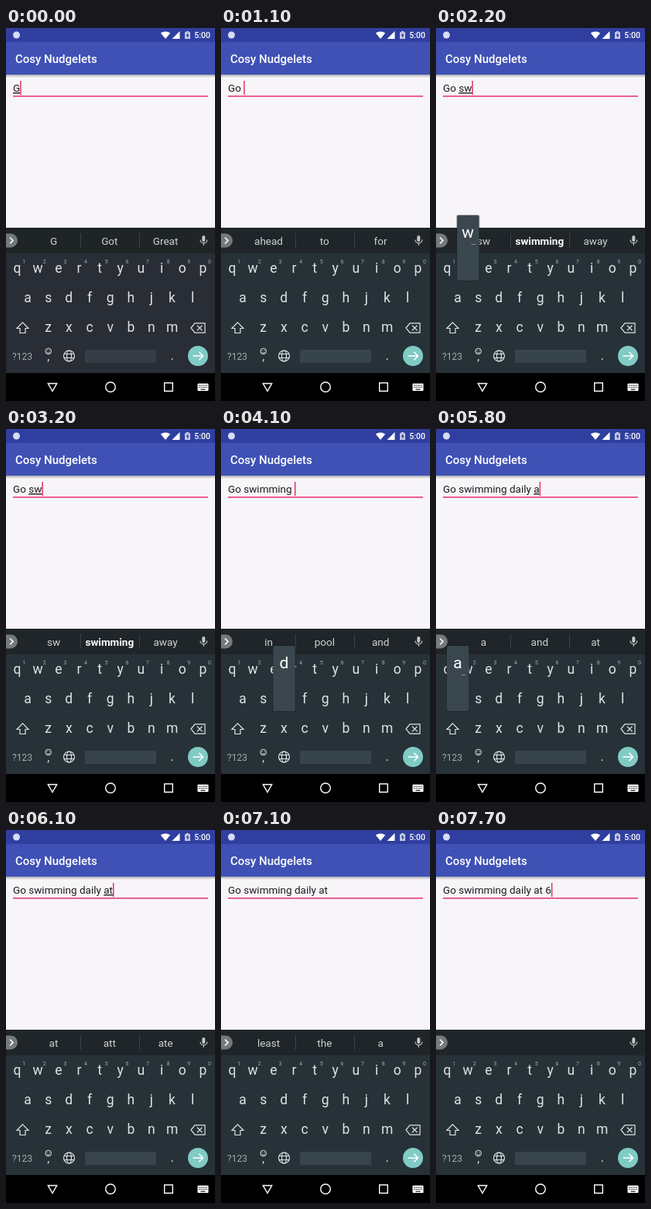
Recreate the animation shown at these times as an HTML page. Size 270 by 480 pixels, loop 8000 ms.

```html
<!DOCTYPE html>
<html lang="en">
<head>
<meta charset="utf-8">
<title>Reminder typing</title>
<style>
html, body { margin: 0; width: 100%; height: 100%; overflow: hidden; }
svg { display: block; width: 100vw; height: 100vh; font-family: Roboto, sans-serif; }
text { white-space: pre; }
.mid { text-anchor: middle; }
.u { text-decoration: underline; }
.line { fill: none; stroke: #dfe3e5; stroke-width: 1.2; }
</style>
</head>
<body>
<svg viewBox="0 0 270 480">
  <defs>
    <linearGradient id="shade" x2="0" y2="1">
      <stop stop-color="#000" stop-opacity=".3"/>
      <stop offset="1" stop-color="#000" stop-opacity="0"/>
    </linearGradient>
  </defs>
  <rect width="270" height="480" fill="#f8f5f9"/>
  <rect y="60" width="270" height="4" fill="url(#shade)"/>
  <rect width="270" height="60" fill="#3f51b5"/>
  <rect width="270" height="18" fill="#303f9f"/>

  <!-- status bar -->
  <g fill="#fff">
    <circle cx="13.5" cy="9" r="4.5" fill="#d5dcf3"/>
    <path d="M206 14L199.8 6.5Q206 2.3 212.2 6.5ZM224.5 4V14H214.5Z"/>
    <path d="M231 5.2H233V4H236V5.2H238V14H231Z" fill="#c3c9e8"/>
    <path d="M235.2 6L232.6 10H234.2V13L236.6 9H235.2Z" fill="#303f9f"/>
    <text x="264" y="13" font-size="10.5" font-weight="500" text-anchor="end">5:00</text>
    <text x="12" y="45" font-size="15" font-weight="500">Cosy Nudgelets</text>
  </g>

  <!-- input field -->
  <rect x="9" y="87" width="252" height="1.5" fill="#e5326f"/>
  <text id="field" x="9" y="82" font-size="13.5" fill="#1c1c1e"></text>
  <rect id="cursor" y="68" width="1.5" height="18" fill="#e5326f"/>

  <!-- keyboard -->
  <rect id="board" y="290" width="270" height="154"/>
  <rect id="strip" y="257" width="270" height="33"/>
  <g id="words" font-size="13.5" fill="#cdd2d4" class="mid"></g>
  <path d="M0 264.5H6A9 9 0 0 1 6 282.5H0Z" fill="#74797b"/>
  <path d="M5 269.5L9 273.5L5 277.5" class="line" style="stroke:#fff;stroke-width:1.6"/>
  <rect x="253.3" y="267" width="4" height="8" rx="2" fill="#c3c8ca"/>
  <path d="M251 272.5A4.4 4.4 0 0 0 259.8 272.5M255.4 277V279.8" class="line" style="stroke:#c3c8ca"/>
  <g id="keys" font-size="17.5" fill="#dfe3e5" class="mid"></g>
  <g class="line">
    <path d="M21.5 378.8L29 386.5H25V392.5H18V386.5H14Z"/>
    <path d="M239 386L244 379.8H257V392.2H244ZM247 382.8L253.5 389.2M253.5 382.8L247 389.2"/>
    <circle cx="81.5" cy="422" r="7"/>
    <ellipse cx="81.5" cy="422" rx="3" ry="7"/>
    <path d="M75 419.5H88M75 424.5H88"/>
    <circle cx="54.7" cy="416" r="3.8" stroke-width="1"/>
    <path d="M52.7 417A2.2 2.2 0 0 0 56.7 417M53.2 414.4V415.4M56.2 414.4V415.4" stroke-width="1"/>
  </g>
  <g class="mid" fill="#dfe3e5">
    <text x="21" y="427" font-size="12" fill="#a3abaf">?123</text>
    <text x="54.7" y="428" font-size="15">,</text>
    <text x="214.7" y="427" font-size="17">.</text>
  </g>
  <rect id="space" x="102" y="414" width="92" height="17" rx="1.5"/>
  <circle cx="248" cy="422" r="13" fill="#80cbc4"/>
  <path d="M241.5 422H254.5M249.3 416.8L254.5 422L249.3 427.2" class="line" style="stroke:#fff;stroke-width:1.6"/>

  <!-- navigation bar -->
  <rect y="444" width="270" height="36" fill="#000"/>
  <g class="line" style="stroke:#fff;stroke-width:1.4">
    <path d="M54.3 457.5H65.7L60 467.3Z"/>
    <circle cx="135" cy="462" r="6.3"/>
    <rect x="204.7" y="456.7" width="10.6" height="10.6"/>
  </g>
  <rect x="247.5" y="457.5" width="14" height="9.5" rx="1" fill="#fff"/>
  <path d="M249.3 460.2H260M249.3 462.5H260" stroke="#000" stroke-width="1.2" stroke-dasharray="1.2 1.1"/>
  <path d="M251.5 465.1H257.5" stroke="#000" stroke-width="1.1"/>

  <g id="popup" class="mid" fill="#fff"></g>
</svg>
<script>
const $ = id => document.getElementById(id);
const PITCH = 26.65, LOOP = 8000;
const rows = [
  { letters: 'qwertyuiop', x: 14.5, y: 314.5 },
  { letters: 'asdfghjkl', x: 28, y: 352.5 },
  { letters: 'zxcvbnm', x: 54.7, y: 391 }
];
const label = (s, x, y, attrs = '') => `<text x="${x}" y="${y}" ${attrs}>${s}</text>`;

const keys = {};
let keyMarkup = '';
for (const row of rows) {
  [...row.letters].forEach((c, i) => {
    const x = row.x + i * PITCH;
    keys[c] = { x, top: row.y - 73.5 };
    keyMarkup += label(c, x, row.y);
    if (row === rows[0]) keyMarkup += label((i + 1) % 10, x + 8.6, 302.5, 'font-size="7" fill="#a3abaf"');
  });
}
keys[6] = keys.y;
$('keys').innerHTML = keyMarkup;

// [time, pressed key, text, suggestions]; "_" starts the underlined word,
// "*" marks a bold suggestion, "pick" presses the middle suggestion.
const steps = [
  [0, '', '_G', 'G Got Great'],
  [200, 'o'],
  [300, 'o', '_Go', 'Go Good Got'],
  [400, ''],
  [1000, ' '],
  [1100, '', 'Go ', 'ahead to for'],
  [1800, 's'],
  [1900, 's', 'Go _s', 's see so'],
  [2000, ''],
  [2100, 'w'],
  [2200, 'w', 'Go _sw', 'sw *swimming away'],
  [2300, ''],
  [3600, 'pick'],
  [3700, '', 'Go swimming ', 'in pool and'],
  [4100, 'd'],
  [4200, 'd', 'Go swimming _d', 'd and day'],
  [4300, ''],
  [4400, 'a'],
  [4500, 'a', 'Go swimming _da', 'da *daily day'],
  [4600, ''],
  [4900, 'pick'],
  [5000, '', 'Go swimming daily ', 'and at with'],
  [5800, 'a', 'Go swimming daily _a', 'a and at'],
  [5900, ''],
  [6000, 't', 'Go swimming daily _at', 'at att ate'],
  [6100, ''],
  [6500, ' '],
  [6600, '', 'Go swimming daily at ', 'least the a'],
  [7200, 'y'],
  [7500, '6'],
  [7600, '6', 'Go swimming daily at 6', ''],
  [7700, '']
];

function drawWords(list, picked) {
  let out = picked ? '<rect x="97" y="257" width="75" height="33" fill="#37474f"/>' : '';
  if (list) {
    out += '<path d="M96.5 264V283M172.5 264V283" stroke="#3b4347"/>';
    list.split(' ').forEach((word, i) => {
      const bold = word[0] === '*' ? 'font-weight="700" fill="#fff"' : '';
      out += label(word.replace('*', ''), 61.5 + i * 72.3, 279, bold);
    });
  }
  $('words').innerHTML = out;
}

function drawPopup(c) {
  const key = keys[c];
  if (!key) return $('popup').innerHTML = '';
  const { x, top } = key;
  const box = (grow, fill) => `<rect x="${x - 14 - grow}" y="${top - grow}" width="${28.5 + 2 * grow}"
    height="${84 + 2 * grow}" rx="2" ${fill}/>`;
  $('popup').innerHTML = box(0.8, 'fill="#000" opacity=".25"') + box(0, 'fill="#3a474e"') +
    label(c, x, top + 29, 'font-size="21"') +
    ('d6'.includes(c) ? '' : label('…', x + 7.3, top + 38, 'font-size="9"'));
}

let shown = -1;
function frame(now) {
  const t = now % LOOP;
  const n = steps.findLastIndex(s => s[0] <= t);
  const typed = steps.findLast(s => s[0] <= t && s.length > 2);
  const [since, , text, list] = typed;
  if (n !== shown) {
    shown = n;
    const press = steps[n][1];
    const [plain, active] = text.split('_');
    $('field').innerHTML = plain + (active ? `<tspan class="u">${active}</tspan>` : '');
    $('cursor').setAttribute('x', 9 + $('field').getComputedTextLength());
    $('board').setAttribute('fill', n ? '#263238' : '#292d36');
    $('strip').setAttribute('fill', n ? '#1f2529' : '#1f2426');
    $('space').setAttribute('fill', press === ' ' ? '#56646b' : n ? '#37444b' : '#373b43');
    drawWords(list, press === 'pick');
    drawPopup(press);
  }
  $('cursor').style.display = (t - since) % 1000 < 500 ? '' : 'none';
  requestAnimationFrame(frame);
}
requestAnimationFrame(frame);
</script>
</body>
</html>
```
